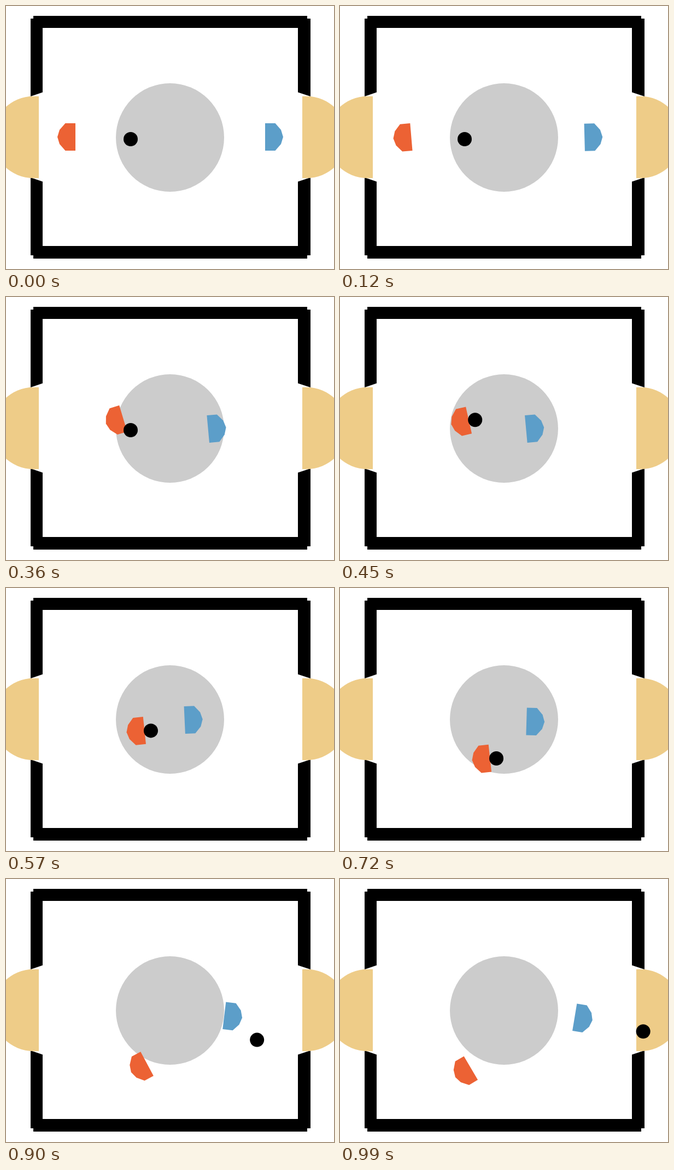
Recreate the animation shown at these times as an HTML page with a canvas. Size 600x480 px, loop 1.02 s.

```html
<!DOCTYPE html>
<html lang="en">
<head>
<meta charset="utf-8">
<title>Table game</title>
<style>
  html, body { margin: 0; width: 100%; height: 100%; overflow: hidden; background: #fff; }
  canvas { display: block; }
</style>
</head>
<body>
<canvas id="c" width="600" height="480"></canvas>
<script>
const ctx = document.getElementById('c').getContext('2d');
const LOOP = 1020, STEP = 30;
const CATCH = 360, SHOT = 750;
const LAG = 40; // ms for a paddle to take up a new speed

// Position under steering commands [time, speed], each reached with a lag.
function steer(from, ...commands) {
  return t => {
    let pos = from, last = 0;
    for (const [at, speed] of commands) {
      const d = Math.max(0, t - at);
      pos += (speed - last) * (d - LAG * (1 - Math.exp(-d / LAG)));
      last = speed;
    }
    return pos;
  };
}

const red = {
  color: '#ec6234', side: -1,
  x: steer(127, [90, 0.38], [CATCH, 0.14], [742, -0.21]),
  y: steer(239, [165, -0.33], [218, 0], [418, 0.34], [725, 0.085]),
  turn: steer(0, [60, -0.168], [160, 0], [380, 0.112], [480, 0], [700, -0.15], [868, 0])
};
const blue = {
  color: '#5c9ec9', side: 1,
  x: steer(474, [0, -0.326], [454, 0], [640, 0.333]),
  y: steer(239, [0, 0.01], [200, 0], [610, 0.033]),
  turn: steer(0, [40, -0.033], [200, 0], [440, 0.029])
};

function pose(p, t) {
  return { x: p.x(t), y: p.y(t), a: p.turn(t) * Math.PI / 180 };
}

// Ball in front of the red paddle, sliding to its middle after contact.
function held(t) {
  const { x, y, a } = pose(red, t);
  const k = Math.max(0, 1 - (t - CATCH) / 100) ** 2;
  const n = 11.5 - 4.8 * k, s = 1.7 + 22.7 * k;
  return [x + n * Math.cos(a) - s * Math.sin(a), y + n * Math.sin(a) + s * Math.cos(a)];
}

function ballAt(t) {
  if (t <= CATCH) return [228, 243];
  if (t <= SHOT) return held(t);
  const [x, y] = held(SHOT), d = t - SHOT;
  return [x + 1.17 * d - 0.00028 * d * d, y - 0.17 * d];
}

function disc(x, y, r, color) {
  ctx.fillStyle = color;
  ctx.beginPath();
  ctx.arc(x, y, r, 0, 2 * Math.PI);
  ctx.fill();
}

function poly(points, color) {
  ctx.fillStyle = color;
  ctx.beginPath();
  points.forEach(([x, y]) => ctx.lineTo(x, y));
  ctx.fill();
}

function wall(outer, inner) {
  poly([[outer, 23], [inner, 23], [inner, 157.5], [outer, 165]], '#000');
  poly([[outer, 455], [inner, 455], [inner, 320.5], [outer, 313]], '#000');
}

// Half disc about x, extended straight to the flat edge.
function goal(x, flat) {
  const y = 239.5, r = 74.7, left = flat < x;
  ctx.fillStyle = '#ec8';
  ctx.beginPath();
  ctx.moveTo(flat, y - r);
  ctx.arc(x, y, r, -Math.PI / 2, Math.PI / 2, !left);
  ctx.lineTo(flat, y + r);
  ctx.fill();
}

function paddle(p, t) {
  const { x, y, a } = pose(p, t);
  ctx.save();
  ctx.translate(x, y);
  ctx.rotate(a);
  ctx.scale(p.side, 1);
  poly([[0, -25], [18.5, -25], [29, -13], [33, 0], [29, 13], [18.5, 25], [0, 25]], p.color);
  ctx.restore();
}

function draw(t) {
  ctx.fillStyle = '#fff';
  ctx.fillRect(0, 0, 600, 480);
  disc(300, 240, 99, '#ccc');
  ctx.fillStyle = '#000';
  ctx.fillRect(50, 18, 501, 22);
  ctx.fillRect(50, 438, 501, 23);
  wall(45, 67);
  wall(557, 534);
  goal(50, 60);
  goal(550, 542);
  paddle(red, t);
  paddle(blue, t);
  disc(...ballAt(t), 13, '#000');
}

const start = performance.now();
function tick() {
  const t = (performance.now() - start) % LOOP;
  draw(Math.floor(t / STEP) * STEP);
  requestAnimationFrame(tick);
}
tick();
</script>
</body>
</html>
```
